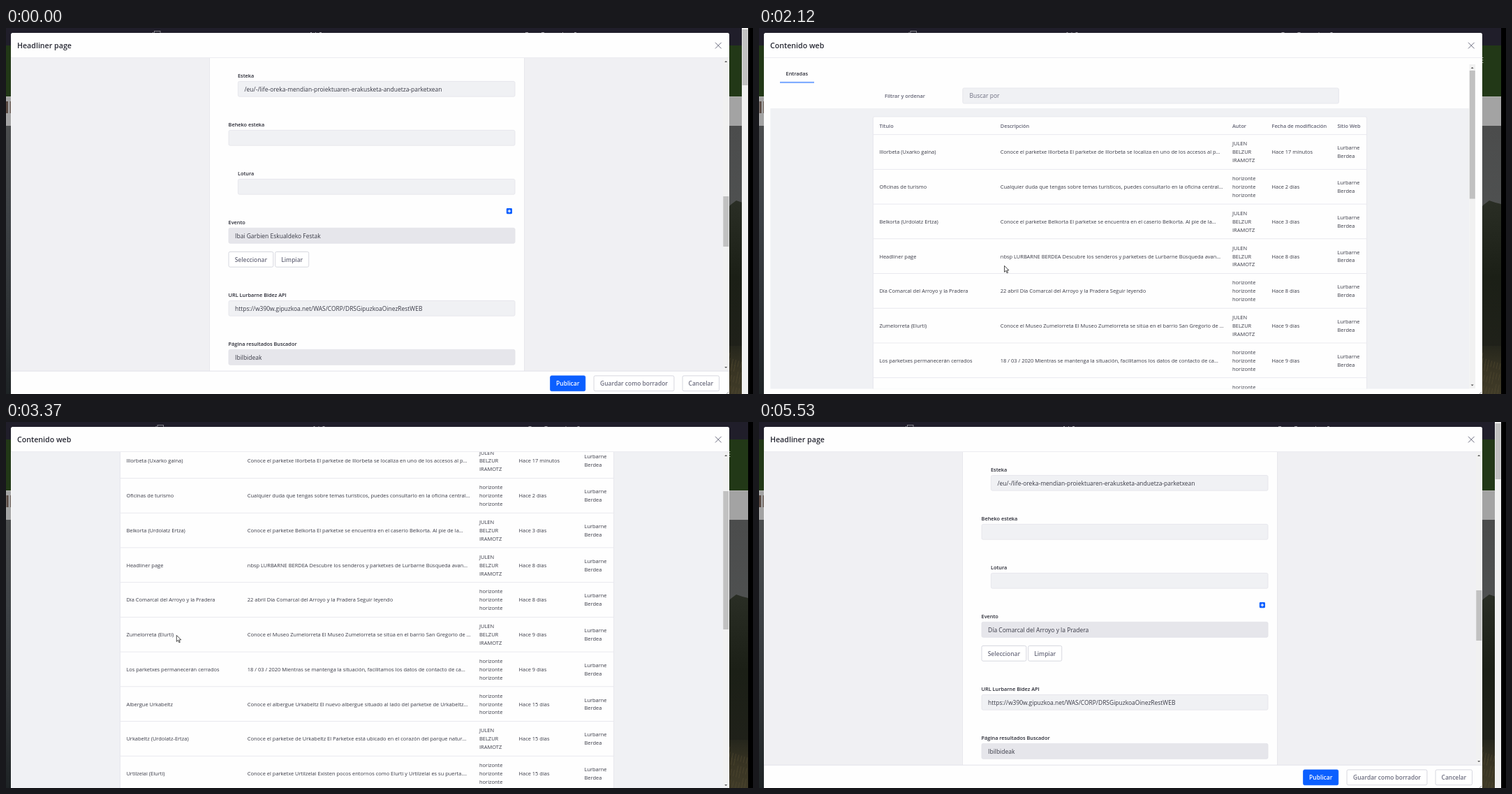
An HTML page with a canvas that plays this animation: 1070 by 524 pixels, repeating every 6920 ms.

```html
<!DOCTYPE html>
<html lang="es">
<head>
<meta charset="utf-8">
<title>Contenido web</title>
<style>
html, body { margin: 0; width: 100%; height: 100%; overflow: hidden; background: #000; }
canvas { display: block; width: 1070px; height: 524px; }
</style>
</head>
<body>
<canvas id="stage" width="1070" height="524"></canvas>
<script>
const ctx = document.getElementById('stage').getContext('2d');
const LOOP = 6920, PAGE = 1063;
const INK = '#272833', TEXT = '#393a46', MUTED = '#6b6c7e', HEAD = '#616273', LINE = '#e4e4ea';
const PALE = '#f0f1f4', BLUE = '#0b5fff';

const EVENT_OLD = 'Ibai Garbien Eskualdeko Festak';
const EVENT_NEW = 'Día Comarcal del Arroyo y la Pradera';
const EDITOR = ['JULEN', 'BELZUR', 'IRAMOTZ'];
const SYSTEM = ['horizonte', 'horizonte', 'horizonte'];
const SITE = ['Lurbarne', 'Berdea'];

const ROWS = [
  ['Illorbeta (Uxarko gaina)', 'Conoce el parketxe Illorbeta El parketxe de Illorbeta se localiza en uno de los accesos al p…', EDITOR, '17 minutos'],
  ['Oficinas de turismo', 'Cualquier duda que tengas sobre temas turísticos, puedes consultarlo en la oficina central…', SYSTEM, '2 días'],
  ['Belkorta (Urdolatz Ertza)', 'Conoce el parketxe Belkorta El parketxe se encuentra en el caserío Belkorta. Al pie de la…', EDITOR, '3 días'],
  ['Headliner page', 'nbsp LURBARNE BERDEA Descubre los senderos y parketxes de Lurbarne Búsqueda avan…', EDITOR, '8 días'],
  [EVENT_NEW, '22 abril ' + EVENT_NEW + ' Seguir leyendo', SYSTEM, '8 días'],
  ['Zumelorreta (Elurti)', 'Conoce el Museo Zumelorreta El Museo Zumelorreta se sitúa en el barrio San Gregorio de …', EDITOR, '9 días'],
  ['Los parketxes permanecerán cerrados', '18 / 03 / 2020 Mientras se mantenga la situación, facilitamos los datos de contacto de ca…', SYSTEM, '9 días'],
  ['Albergue Urkabeltz', 'Conoce el albergue Urkabeltz El nuevo albergue situado al lado del parketxe de Urkabeltz…', SYSTEM, '15 días'],
  ['Urkabeltz (Urdolatz-Ertza)', 'Conoce el parketxe de Urkabeltz El Parketxe está ubicado en el corazón del parque natur…', EDITOR, '15 días'],
  ['Urtilzelai (Elurti)', 'Conoce el parketxe Urtilzelai Existen pocos entornos como Elurti y Urtilzelai es su puerta.…', SYSTEM, '15 días']
];

// start time, scene
const SCENES = [[0, 'before'], [1530, 'loading'], [1810, 'blank'], [2120, 'padded'],
  [2450, 'list'], [3370, 'scrolled'], [4290, 'after']];

// start time, pointer shape, tip position
const POINTER = [[0, null], [250, arrow, 556, 369], [570, hand, 338.5, 329], [890, hand, 363.5, 329.5],
  [1530, arrow, 362, 328.5], [1810, arrow, 351.2, 340], [2750, arrow, 255, 325], [3050, arrow, 239.4, 320],
  [3370, arrow, 244, 305], [3680, arrow, 244, 266], [3990, hand, 238.5, 258],
  [4290, arrow, 237.7, 257], [5230, arrow, 406, 280], [5530, null]];

const at = (steps, t) => steps.filter(s => s[0] <= t).pop();

function rect(x, y, w, h, fill) {
  ctx.fillStyle = fill;
  ctx.fillRect(x, y, w, h);
}

function box(x, y, w, h, fill, stroke, r = 2) {
  ctx.beginPath();
  ctx.roundRect(x, y, w, h, r);
  ctx.fillStyle = fill;
  ctx.fill();
  if (stroke) { ctx.strokeStyle = stroke; ctx.lineWidth = 0.8; ctx.stroke(); }
}

function path(points, fill, stroke, width = 1) {
  ctx.beginPath();
  points.forEach(([x, y]) => ctx.lineTo(x, y));
  if (fill) { ctx.closePath(); ctx.fillStyle = fill; ctx.fill(); }
  if (stroke) { ctx.strokeStyle = stroke; ctx.lineWidth = width; ctx.stroke(); }
}

// y is the middle of the capitals
function text(str, x, y, size = 7.47, color = TEXT, weight = 400, align = 'left') {
  ctx.font = `${weight} ${size}px "Open Sans", "Noto Sans", sans-serif`;
  ctx.textAlign = align;
  ctx.fillStyle = color;
  ctx.fillText(str, x, y + size * 0.36);
}

function gradient(y0, y1, ...colors) {
  const g = ctx.createLinearGradient(0, y0, 0, y1);
  colors.forEach((c, i) => g.addColorStop(i / (colors.length - 1), c));
  return g;
}

function clipped(x, y, w, h, draw) {
  ctx.save();
  ctx.beginPath();
  ctx.rect(x, y, w, h);
  ctx.clip();
  draw();
  ctx.restore();
}

function scrollbar(x, top, bottom, from, to) {
  rect(x, top, 8.5, bottom - top, '#f1f1f1');
  rect(x + 0.3, from, 8, to - from, '#c1c1c1');
  const mid = x + 4.2;
  path([[mid - 2, top + 6], [mid, top + 4], [mid + 2, top + 6]], '#505050');
  path([[mid - 2, bottom - 6], [mid, bottom - 4], [mid + 2, bottom - 6]], '#505050');
}

function page(wide) {
  const dx = wide ? 4.5 : 0;
  rect(0, 0, 1070, 524, '#000');
  rect(0, 0, PAGE, 25, '#201e2a');
  rect(0, 25, PAGE, 73, '#223817');
  rect(0, 98, PAGE, 42, '#a3a3a3');
  for (let x = 0; x < PAGE; x += 2) rect(x, 98, 1, 1, '#c0c0bc');
  rect(0, 140, 10, 384, gradient(140, 524, '#4b4d4e', '#3e4246', '#303437', '#1e2325'));
  rect(wide ? 0.5 : 0, 105, 3, 17, '#584840');
  rect(wide ? 6 : 5.5, 105, 2, 17, '#685b54');

  rect(1030, 140, PAGE - 1030, 384, gradient(140, 300, '#4b4c4c', '#505252'));
  path([[1030, 262], [1038, 253], [1046, 247], [1055, 250], [PAGE, 252], [PAGE, 524], [1030, 524]],
    gradient(245, 470, '#2a2e25', '#1b1f16', '#20211a'));
  rect(1030, 455, PAGE - 1030, 69, gradient(455, 524, '#25261c', '#383423', '#403b28'));
  for (let i = 0; i < 26; i++) {
    const x = 1035 + (i * 7.3) % 26, y = 465 + (i * 17.9) % 55;
    path([[x, y + 9], [x + 2, y]], null, '#524b32', 0.6);
  }

  const mark = '#9a99a0';
  ctx.strokeStyle = mark;
  ctx.lineWidth = 0.8;
  ctx.strokeRect(212.5 + dx, 4.5, 8.5, 6);
  rect(210 + dx, 6, 1, 1, mark);
  [[436, 2], [443, 1], [449, 3], [744, 4], [767, 4], [797, 1], [814, 3]].forEach(([x, w]) => rect(x + dx, 6, w, 1, mark));
  if (wide) [42, 45.5, 49].forEach(y => rect(1033, y, 4.5, 1, '#a9b3a4'));
  else {
    rect(1054, 0, PAGE - 1054, 524, '#f1f1f1');
    rect(1054.7, 2, 7.8, 80, '#c1c1c1');
  }
}

function modal(title) {
  box(7, 7, 1029, 530, '#fefefe', null, 2.5);
  rect(7, 42, 1029, 1, '#ececf0');
  text(title, 16, 25.2, 10.65, INK, 600);
  path([[1016, 20.8], [1024.6, 29.4]], null, MUTED);
  path([[1024.6, 20.8], [1016, 29.4]], null, MUTED);
}

function grip() {
  path([[1032, 524], [1035, 521]], null, '#8a8a8a', 0.8);
}

function field(label, x, y, value = '', locked = false) {
  text(label, x, y - 8, 7.33, INK, 600);
  box(x + 0.4, y + 0.4, 728.6 - x, 21.8, locked ? '#e6e6eb' : PALE, locked ? '#e1e1e8' : LINE);
  text(value, x + 9.5, y + 12, 8.47);
}

function button(label, x, y, w, color = MUTED, fill = '#fff', border = '#cdced9') {
  box(x + 0.4, y + 0.4, w - 0.8, 21.8, fill, border);
  text(label, x + w / 2, y + 11.5, 8.43, color, 600, 'center');
}

function form(event, hover) {
  rect(7.5, 43, 1019.5, 448, '#f0f0f3');
  rect(291, 43, 452, 448, '#e8e8ec');
  rect(292, 43, 450, 448, '#fefefe');
  scrollbar(1027, 43, 491, 241, 313);
  field('Esteka', 332, 76, '/eu/-/life-oreka-mendian-proiektuaren-erakusketa-anduetza-parketxean');
  field('Beheko esteka', 318.6, 146);
  field('Lotura', 332, 216);
  box(716.8, 258, 8.2, 8.2, BLUE, null, 1.4);
  rect(718.7, 261.5, 4.4, 1.2, '#fff');
  rect(720.3, 259.9, 1.2, 4.4, '#fff');
  field('Evento', 318.6, 286, event, true);
  button('Seleccionar', 318.6, 320, 64.6, hover ? INK : MUTED);
  button('Limpiar', 385.3, 320, 48.8);
  field('URL Lurbarne Bidez API', 318.6, 390, 'https://w390w.gipuzkoa.net/WAS/CORP/DRSGipuzkoaOinezRestWEB');
  field('Página resultados Buscador', 318.6, 460, 'Ibilbideak', true);
  rect(7, 491, 1029, 33, '#fefefe');
  rect(7, 490.7, 1029, 0.9, '#dfdfe6');
  button('Publicar', 779.2, 497.5, 51, '#fff', BLUE, BLUE);
  button('Guardar como borrador', 841.7, 497.5, 115.6);
  button('Cancelar', 968.7, 497.5, 53.2);
  grip();
}

function spinner() {
  const dots = [[9, -3.7, 4.3, '#272c38'], [0, -8.2, 3.5, '#4f5056'], [-9, -3.7, 3.1, '#818186'],
    [-9, 5.3, 2.7, '#a9a9ad'], [0, 9.6, 2, '#dadadd'], [9, 5.3, 2.3, '#b9b9bd']];
  dots.forEach(([x, y, r, color]) => {
    ctx.beginPath();
    ctx.arc(522.5 + x, 285 + y, r, 0, 7);
    ctx.fillStyle = color;
    ctx.fill();
  });
}

function icons(y) {
  path([[243.5, y - 1.8], [250, y - 1.8], [246.7, y + 2]], MUTED);
  path([[271.2, y + 4.5], [271.2, y - 4]], null, MUTED, 1.1);
  path([[269, y - 1.8], [271.2, y - 4.2], [273.4, y - 1.8]], null, MUTED, 1.1);
  path([[276.2, y - 4.5], [276.2, y + 4]], null, MUTED, 1.1);
  path([[274, y + 1.8], [276.2, y + 4.2], [278.4, y + 1.8]], null, MUTED, 1.1);
  ctx.beginPath();
  ctx.arc(815.6, y - 0.9, 2.6, 0, 7);
  ctx.stroke();
  path([[817.5, y + 1], [820.2, y + 3.7]], null, MUTED, 1.4);
  ctx.lineWidth = 1.1;
  ctx.strokeRect(844.6, y - 3.9, 8.2, 7.8);
  path([[848.7, y - 4], [848.7, y + 4]], null, MUTED, 1.1);
  path([[844.6, y], [852.8, y]], null, MUTED, 1.1);
}

function list(left, right, y, full, linked) {
  rect(left, y + 18, right - left, 600, PALE);
  text('Entradas', left + 38, y - 31.5, 7.4, INK, 600, 'center');
  rect(left + 13.7, y - 20.2, 49, 2.2, '#80acff');
  text('Filtrar y ordenar', 180, y, 7.4, HEAD, 600);
  box(291.8, y - 11, 538.6, 22, PALE, LINE);
  text('Buscar por', 301.6, y, 8.47, MUTED);
  if (full) icons(y);

  box(163.4, y + 30, 707.2, 600, '#fefefe', LINE);
  const heads = [['Título', 172.4], ['Descripción', 345.8], ['Autor', 678], ['Fecha de modificación', 734.5], ['Sitio Web', 828.5]];
  heads.forEach(([label, x]) => text(label, x, y + 43, 7.33, HEAD, 600));
  ROWS.forEach(([title, about, author, age], i) => {
    const top = y + 55.2 + i * 49.72, mid = top + 25.5;
    rect(163.4, top, 707.2, 0.9, '#e7e7ed');
    text(title, 172.4, mid);
    if (linked && i === 4) rect(172.4, mid + 3.7, ctx.measureText(title).width, 0.8, TEXT);
    text(about, 345.8, mid);
    author.forEach((part, n) => text(part, 678, mid + (n - 1) * 11.9));
    text('Hace ' + age, 734.5, mid);
    SITE.forEach((part, n) => text(part, 828.5, mid - 6 + n * 11.9));
  });
}

function arrow(x, y) {
  const shape = [[0, 0], [0, 16], [3.9, 12.4], [6.6, 18.6], [9, 17.6], [6.4, 11.6], [11.6, 11.6]];
  path([...shape, [0, 0]].map(([a, b]) => [x + 0.3 + a * 0.56, y + 0.4 + b * 0.56]), '#fff', '#222', 0.8);
}

function hand(x, y) {
  ctx.beginPath();
  ctx.moveTo(x - 0.9, y + 7.4);
  ctx.lineTo(x - 0.9, y + 1.2);
  ctx.quadraticCurveTo(x, y - 0.5, x + 0.9, y + 1.2);
  ctx.lineTo(x + 0.9, y + 4.5);
  ctx.quadraticCurveTo(x + 2, y + 3.6, x + 2.6, y + 4.9);
  ctx.quadraticCurveTo(x + 3.6, y + 4.1, x + 4.1, y + 5.3);
  ctx.quadraticCurveTo(x + 5.2, y + 4.9, x + 5.4, y + 6.2);
  ctx.lineTo(x + 5.2, y + 9);
  ctx.lineTo(x + 4.2, y + 12);
  ctx.lineTo(x - 0.5, y + 12);
  ctx.lineTo(x - 3.2, y + 8);
  ctx.quadraticCurveTo(x - 3.6, y + 5.8, x - 0.9, y + 7.4);
  ctx.fillStyle = '#fff';
  ctx.fill();
  ctx.strokeStyle = '#222';
  ctx.lineWidth = 0.8;
  ctx.stroke();
  [0.9, 2.6, 4.1].forEach(d => path([[x + d, y + 4.9], [x + d, y + 6.8]], null, '#222', 0.6));
}

const VIEWS = {
  before: t => form(EVENT_OLD, t >= 570),
  loading: spinner,
  blank: grip,
  padded() {
    clipped(16, 52, 1010, 464.5, () => {
      list(16.3, 1017.5, 97, false);
      scrollbar(1017.5, 52, 516.5, 61, 244.5);
    });
    grip();
  },
  list() {
    clipped(7.5, 43, 1028, 481, () => {
      list(7.5, 1027, 88.2, true);
      scrollbar(1027, 43, 525, 52, 250);
    });
  },
  scrolled(t) {
    clipped(7.5, 43, 1028, 481, () => {
      list(7.5, 1027, -24.9, true, t >= 3990);
      scrollbar(1027, 43, 525, 99, 297);
    });
  },
  after: () => form(EVENT_NEW)
};

function draw(t) {
  const scene = at(SCENES, t)[1];
  const editing = scene === 'before' || scene === 'after';
  page(!editing);
  modal(editing ? 'Headliner page' : 'Contenido web');
  VIEWS[scene](t);
  const [, shape, x, y] = at(POINTER, t);
  if (shape) shape(x, y);
}

const start = performance.now();
function tick() {
  draw((performance.now() - start) % LOOP);
  requestAnimationFrame(tick);
}
tick();
</script>
</body>
</html>
```
